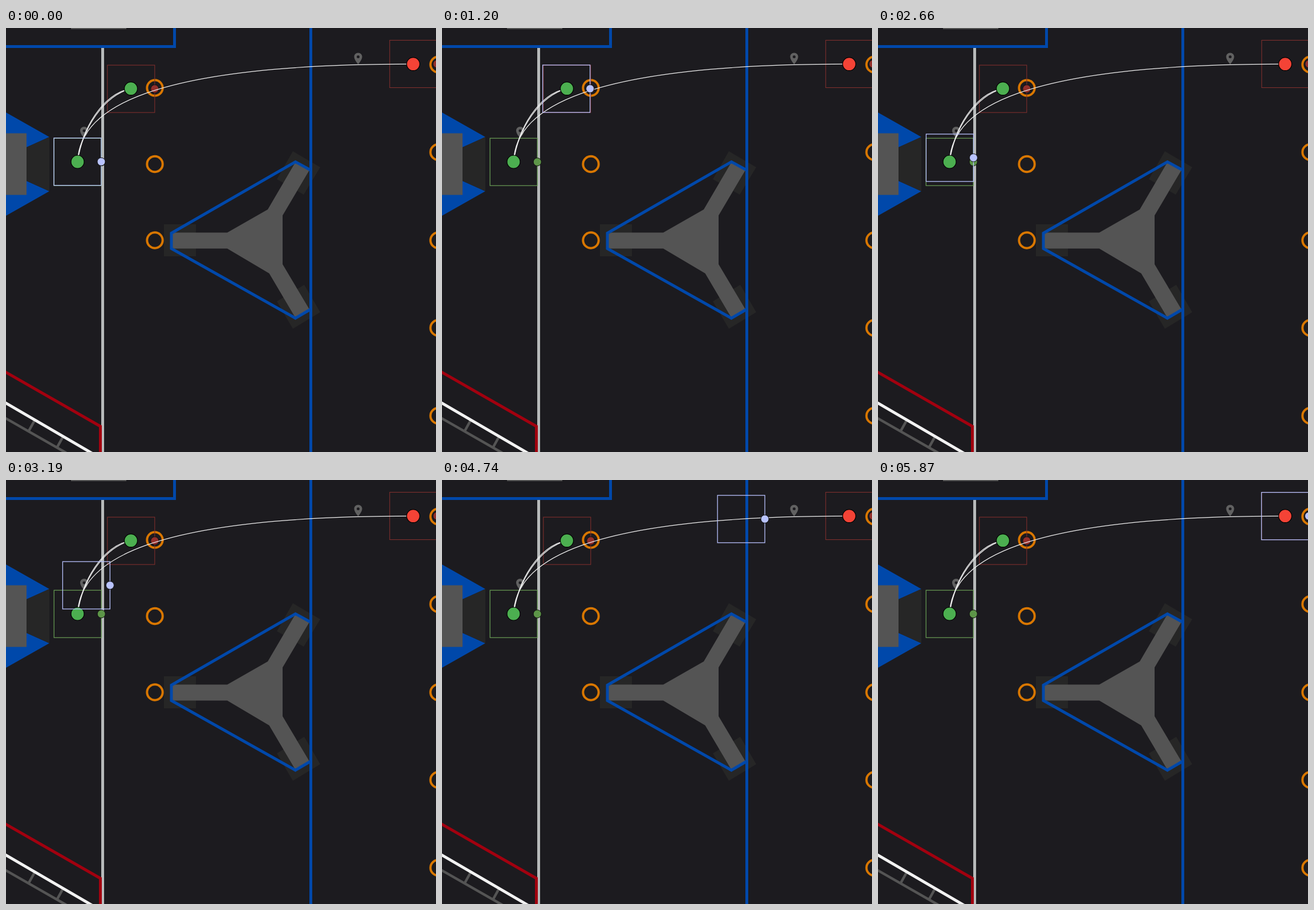
An HTML page that plays this animation: 754 px wide and 743 px high, repeating every 5.93 s.

```html
<!DOCTYPE html>
<html lang="en">
<head>
<meta charset="utf-8">
<title>Path preview</title>
<style>
html, body { margin: 0; width: 100%; height: 100%; overflow: hidden; background: #1c1b1f; }
svg { display: block; }
.ring { fill: none; stroke: #d97700; stroke-width: 4; }
.blue { fill: none; stroke: #0048aa; stroke-width: 5; }
.path { fill: none; stroke: #f0f0f0; stroke-width: 1.2; }
.pad { fill: #262626; }
.steel { fill: #545454; }
.rail { fill: none; stroke: #545454; stroke-width: 4.5; }
</style>
</head>
<body>
<svg width="754" height="743" viewBox="0 0 754 743">
  <defs>
    <path id="pin" fill="#616161" d="M0-20c-3.87 0-7 3.13-7 7c0 5.25 7 13 7 13s7-7.75 7-13c0-3.87-3.13-7-7-7zm0 9.5a2.5 2.5 0 0 1 0-5a2.5 2.5 0 0 1 0 5z"/>
  </defs>

  <!-- Field -->
  <path class="steel" d="M114 0H211V2H114z"/>
  <path class="blue" d="M0 32.5H295.5V0"/>
  <path fill="#0048aa" d="M0 148L76 191L36 209V268L76 286L0 329z"/>
  <path class="pad" d="M36 209L76 191V286L36 268z"/>
  <path class="steel" d="M0 184.5H36V292.5H0z"/>
  <path fill="none" stroke="#b7baba" stroke-width="5" d="M169.5 35V743"/>
  <path class="pad" d="M277 344H333V400H277zM503 216L551 244L522 292L475 265zM523 450L551 498L503 527L475 479z"/>
  <path class="steel" d="M291 358.5H388L459 318L507 236L532 249L485 328.500V414L532 493L507 507L461.500 430L388 386.500H291z"/>
  <path class="blue" d="M534.500 0V743"/>
  <path class="blue" stroke-linejoin="miter" d="M534 249L507.500 234.500L290 359.500V386.500L507.500 508.500L534 493"/>
  <path fill="none" stroke="#a2000f" stroke-width="5" d="M-4 601L165.500 698V743"/>
  <path class="rail" d="M-4 682L110 747M50 688L40 706M99.500 717L89.500 735"/>
  <path fill="none" stroke="#f2f2f2" stroke-width="5" d="M-4 655L154 747"/>
  <g id="rings"></g>

  <g id="ghosts"></g>
  <use href="#pin" x="137" y="193"/>
  <use href="#pin" x="617.5" y="63.500"/>
  <g id="paths"></g>
  <g id="waypoints"></g>
  <g id="robot"></g>
</svg>
<script>
const LOOP = 5930;
const FPS = 15;
const HALF = 41.5;

const byId = id => document.getElementById(id);

function add(parent, tag, attrs) {
  const node = document.createElementNS('http://www.w3.org/2000/svg', tag);
  for (const key in attrs) node.setAttribute(key, attrs[key]);
  return parent.appendChild(node);
}

function addRobot(parent, x, y, line, dot, width = 1.2) {
  add(parent, 'rect', {
    x: x - HALF, y: y - HALF, width: 2 * HALF, height: 2 * HALF,
    fill: 'none', stroke: line, 'stroke-width': width
  });
  add(parent, 'circle', { cx: x + HALF, cy: y, r: 7, fill: dot, stroke: '#111', 'stroke-width': 1 });
}

function addRing(cx, cy) {
  add(byId('rings'), 'circle', { class: 'ring', cx, cy, r: 13.7 });
}

[105, 238.5, 372].forEach(y => addRing(261, y));
[64, 217.5, 372, 525.5, 679.5].forEach(y => addRing(758, y));

addRobot(byId('ghosts'), 219.3, 106.6, '#7f2f2d', '#93302c', 1.1);
addRobot(byId('ghosts'), 714.3, 63, '#7f2f2d', '#93302c', 1.1);
addRobot(byId('ghosts'), 125.7, 234.7, '#6a9f55', '#5d9548');

[[125.5, 234.5, '#4caf50'], [219, 106.2, '#4caf50'], [714, 63.2, '#f44336']].forEach(([cx, cy, fill]) =>
  add(byId('waypoints'), 'circle', { cx, cy, r: 11.5, fill, stroke: '#000', 'stroke-width': 1.2 }));

// Each leg: a curve and its speed profile as [seconds, relative speed].
const legs = [
  {
    d: 'M125.5 234.3C131 180 170 113.6 218.8 106.3',
    speed: [[0, 0], [0.59, 267], [1.26, 0]]
  },
  {
    d: 'M218.8 106.3C171 119 134 176 125.5 234.3',
    speed: [[1.28, 0], [1.88, 280], [2.48, 0]]
  },
  {
    d: 'M125.5 234.3C128.5 143 246 63 714 63.2',
    speed: [[2.48, 0], [2.66, 72], [3.06, 115], [3.5, 262], [4.2, 283], [4.937, 283], [5.88, 0]]
  }
];

for (const leg of legs) {
  leg.node = add(byId('paths'), 'path', { class: 'path', d: leg.d });
  leg.length = leg.node.getTotalLength();
  leg.start = leg.speed[0][0];
  leg.total = distance(leg.speed, Infinity);
}

// Area under the piecewise linear speed profile up to time t.
function distance(speed, t) {
  let sum = 0;
  for (let i = 1; i < speed.length; i++) {
    const [t0, v0] = speed[i - 1];
    const [t1, v1] = speed[i];
    const dt = Math.min(Math.max(t - t0, 0), t1 - t0);
    sum += v0 * dt + (v1 - v0) * dt * dt / (2 * (t1 - t0));
  }
  return sum;
}

function robotAt(t) {
  const leg = legs.findLast(item => t >= item.start);
  return leg.node.getPointAtLength(leg.length * distance(leg.speed, t) / leg.total);
}

const robot = byId('robot');
addRobot(robot, 0, 0, '#b9c3ff', '#b9c3ff', 1.3);

function draw(ms) {
  const t = Math.floor((ms % LOOP + 7) * FPS / 1000) / FPS;
  const { x, y } = robotAt(t);
  robot.setAttribute('transform', `translate(${x.toFixed(2)} ${y.toFixed(2)})`);
}

const begin = performance.now();
function tick() {
  draw(performance.now() - begin);
  requestAnimationFrame(tick);
}
tick();
</script>
</body>
</html>
```
